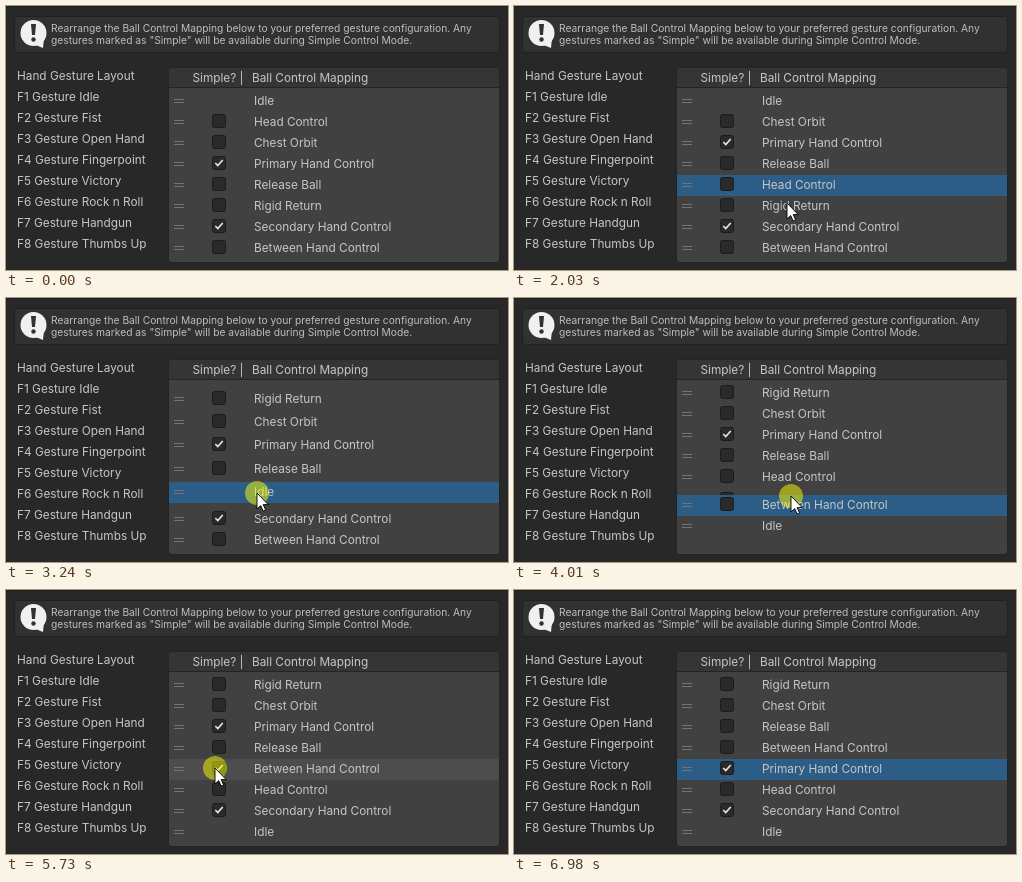
Write an HTML page with a canvas that moves like this. It is 502 px wide and 264 px high and loops after 7940 ms.

```html
<!DOCTYPE html>
<html lang="en">
<head>
<meta charset="utf-8">
<title>Gesture mapping</title>
<style>
html, body { margin: 0; width: 100%; height: 100%; overflow: hidden; background: #282828; }
canvas { display: block; }
</style>
</head>
<body>
<canvas id="stage" width="502" height="264"></canvas>
<script>
const ctx = document.getElementById('stage').getContext('2d');
const LOOP = 7940, TOP = 95, STEP = 21, SLIDE = 120, HOLD = 100;

const rows = ['Idle', 'Head Control', 'Chest Orbit', 'Primary Hand Control',
  'Release Ball', 'Rigid Return', 'Secondary Hand Control', 'Between Hand Control'];
const labels = ['Hand Gesture Layout', 'F1 Gesture Idle', 'F2 Gesture Fist', 'F3 Gesture Open Hand',
  'F4 Gesture Fingerpoint', 'F5 Gesture Victory', 'F6 Gesture Rock n Roll', 'F7 Gesture Handgun',
  'F8 Gesture Thumbs Up'];

// Pointer moves, each easing out to (x, y); those with a row drag it along
const start = { x: 350, y: 230 };
const moves = [
  { at: 580, ms: 670, x: 261, y: 116 },
  { at: 1300, ms: 385, x: 266, y: 180, row: 'Head Control' },
  { at: 1800, ms: 390, x: 274, y: 200 },
  { at: 2235, ms: 255, x: 277, y: 106, row: 'Rigid Return' },
  { at: 2600, ms: 270, x: 255, y: 96 },
  { at: 3080, ms: 300, x: 250, y: 222, row: 'Idle' },
  { at: 3480, ms: 280, x: 272, y: 233 },
  { at: 3955, ms: 163, x: 281, y: 171, row: 'Between Hand Control' },
  { at: 4930, ms: 500, x: 209, y: 178 },
  { at: 5860, ms: 230, x: 255, y: 131 },
  { at: 6110, ms: 330, x: 256, y: 173, row: 'Primary Hand Control' },
  { at: 6540, ms: 440, x: 340, y: 224 }
];
const drags = moves.filter(m => m.row).map(m => ({ row: m.row, from: m.at, to: m.at + m.ms + HOLD }));
const clicks = [{ from: 5490, to: 5560 }, { from: 5730, to: 5860 }];
const lastDrag = drags[drags.length - 1];

function pointer(t) {
  let { x, y } = start;
  for (const m of moves) {
    if (t < m.at) break;
    const left = 1 - Math.min(1, (t - m.at) / m.ms), ease = 1 - left * left;
    x += (m.x - x) * ease;
    y += (m.y - y) * ease;
  }
  return { x, y };
}

const slotY = slot => TOP + STEP * slot;

// Row positions at time t; rows slide exponentially out of the dragged row's way
function layout(t) {
  let order = rows, selected, held;
  const y = {};
  const settle = () => order.forEach((row, slot) => y[row] = slotY(slot));
  settle();
  for (const { row, from, to } of drags) {
    if (t < from) break;
    selected = row;
    const others = order.filter(r => r !== row);
    const grip = y[row] - pointer(from).y;
    const end = Math.min(t, to);
    let target = order.indexOf(row);
    for (let now = from; now < end;) {
      const dt = Math.min(5, end - now);
      now += dt;
      y[row] = Math.min(slotY(7), Math.max(slotY(0), pointer(now).y + grip));
      target = Math.round((y[row] - TOP) / STEP);
      others.forEach((r, i) => {
        const goal = slotY(i < target ? i : i + 1);
        y[r] += (goal - y[r]) * (1 - Math.exp(-dt / SLIDE));
      });
    }
    if (t < to) held = row;
    else {
      others.splice(target, 0, row);
      order = others;
      settle();
    }
  }
  return { y, selected, held, order };
}

function box(x, y, w, h, fill, radius = 0, stroke) {
  ctx.beginPath();
  ctx.roundRect(x, y, w, h, radius);
  ctx.fillStyle = fill;
  ctx.fill();
  if (stroke) outline(stroke, 1);
}
function outline(color, width) {
  ctx.strokeStyle = color;
  ctx.lineWidth = width;
  ctx.stroke();
}
function text(str, x, y, size = 11.8, color = '#c6c6c6') {
  ctx.font = `${size}px Inter, sans-serif`;
  ctx.fillStyle = color;
  ctx.fillText(str, x, y);
}
function polygon(points, x = 0, y = 0) {
  ctx.beginPath();
  points.forEach(([px, py]) => ctx.lineTo(x + px, y + py));
}
function disc(x, y, r, fill) {
  ctx.beginPath();
  ctx.arc(x, y, r, 0, 7);
  ctx.fillStyle = fill;
  ctx.fill();
}

function drawPanel() {
  box(0, 0, 502, 264, '#282828');
  box(0, 0, 502, 1, '#1e1e1e');
  box(8.5, 10.5, 485, 36, '#313131', 3, '#202020');
  disc(27.5, 27, 13, '#f0f0f0');
  polygon([[27, 38], [38, 32], [37, 42]]);
  ctx.fill();
  polygon([[25, 18], [30, 18], [29, 29], [26, 29]]);
  ctx.fillStyle = '#313131';
  ctx.fill();
  disc(27.5, 33.5, 2.2, '#313131');
  text('Rearrange the Ball Control Mapping below to your preferred gesture configuration. Any', 45, 26, 10.25, '#bdbdbd');
  text('gestures marked as "Simple" will be available during Simple Control Mode.', 45, 38, 10.25, '#bdbdbd');
  labels.forEach((label, i) => text(label, 11, 74 + STEP * i));
  box(162.5, 61.5, 331, 20, '#353535', [3, 3, 0, 0], '#242424');
  box(162.5, 81.5, 331, 175, '#414141', [0, 0, 3, 3], '#242424');
  text('Simple? |', 186.5, 76);
  text('Ball Control Mapping', 246, 76);
}

function drawRow(row, y, checked, back) {
  y = Math.round(y);
  if (back) box(163, y - 10, 330, 21, back);
  for (const dy of [-2, 1]) box(168, y + dy, 10, 1, '#747474');
  if (row !== 'Idle') {
    box(206.5, y - 7.5, 13, 13, '#2a2a2a', 2, '#1c1c1c');
    if (checked) {
      polygon([[209.3, -1], [211.8, 1.5], [216.7, -4]], 0, y);
      outline('#e6e6e6', 1.7);
    }
  }
  text(row, 248, y + 4);
}

function drawPointer(t) {
  const p = pointer(t), x = Math.round(p.x), y = Math.round(p.y);
  const pressed = [...drags, ...clicks].some(span => t >= span.from && t < span.to);
  if (pressed) disc(x, y, 12, 'rgba(255,255,0,.5)');
  polygon([[0, 0], [0, 16], [3.7, 12.6], [6.2, 18], [8.6, 17], [6.2, 11.6], [11.2, 11.6]], x, y);
  ctx.closePath();
  ctx.fillStyle = '#fff';
  ctx.fill();
  outline('#000', 0.9);
}

function draw(t) {
  const { y, selected, held, order } = layout(t);
  const [check, uncheck] = clicks;
  const blurred = t >= check.from && t < lastDrag.from;
  const ticked = ['Primary Hand Control', 'Secondary Hand Control'];
  if (t >= check.to && t < uncheck.to) ticked.push('Between Hand Control');
  const paint = row => drawRow(row, y[row], ticked.includes(row),
    row === selected && (blurred ? '#4d4d4d' : '#2c5d87'));
  drawPanel();
  order.filter(row => row !== held).forEach(paint);
  if (held) paint(held);
  if (t >= moves[0].at && t < 6980) drawPointer(t);
}

function tick() {
  draw(performance.now() % LOOP);
  requestAnimationFrame(tick);
}
tick();
</script>
</body>
</html>
```
